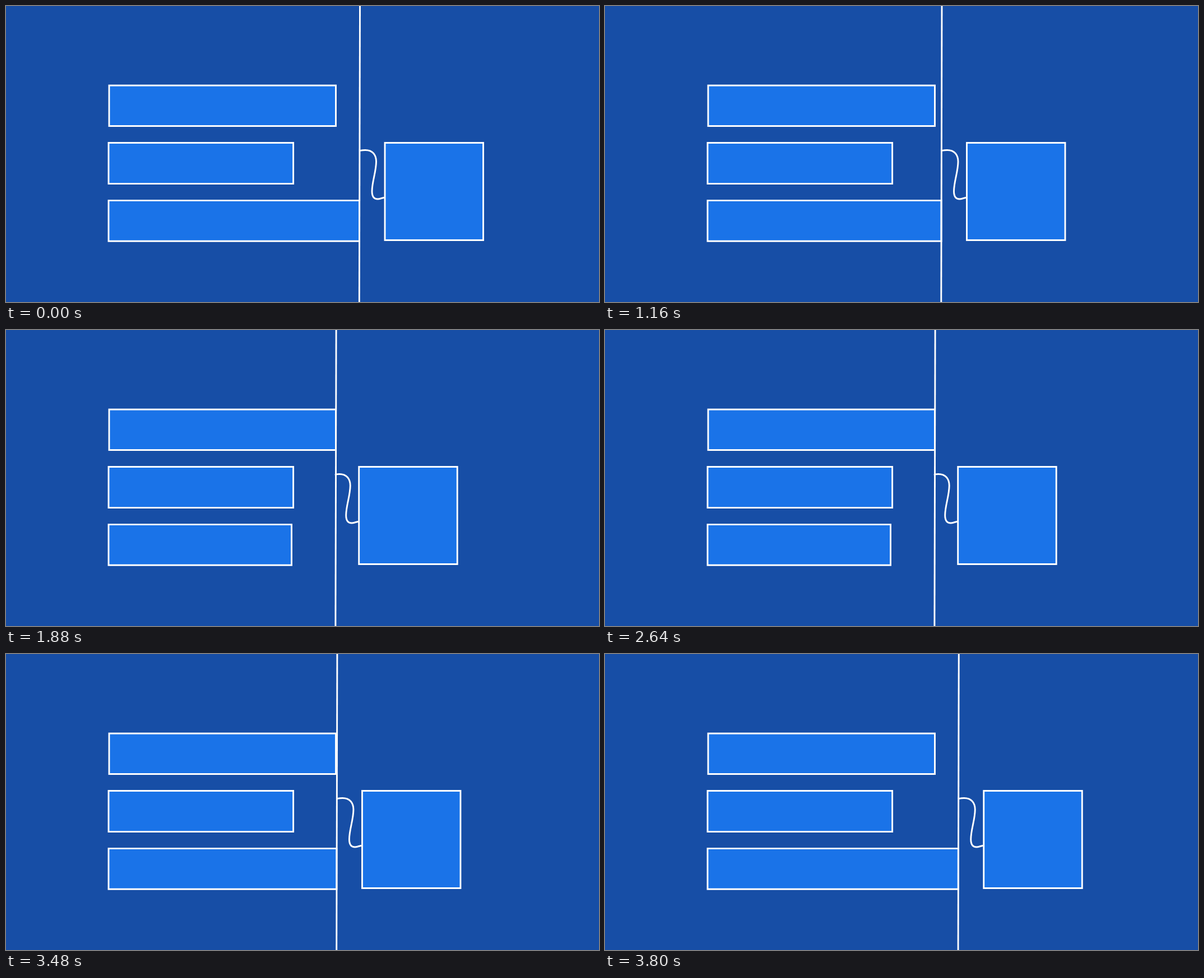
These frames come from a looping animation (1058x529 px, 3840 ms). An HTML page with a canvas:

```html
<!DOCTYPE html>
<html>
<head>
<meta charset="utf-8">
<style>
  html, body { margin: 0; height: 100%; overflow: hidden; background: #174ea6; }
  canvas { display: block; }
</style>
</head>
<body>
<canvas id="stage" width="1058" height="529"></canvas>
<script>
  const ctx = document.getElementById('stage').getContext('2d');
  const LOOP = 3840, STEP = 40, MOVE = 960;
  const WIDE = 630.5, TRAVEL = 121;        // right edge of the bottom bar
  const LINE_STOP = 42.4, BOX_STOP = 46.3; // how far the top bar lets them slide

  function box(left, top, right, bottom) {
    ctx.beginPath();
    ctx.rect(left, top, right - left, bottom - top);
    ctx.fill();
    ctx.stroke();
  }

  function spring(lineX, shift) {
    ctx.beginPath();
    ctx.moveTo(lineX, 258.6);
    ctx.save();
    ctx.translate(-shift, 0);
    ctx.bezierCurveTo(634, 258, 637, 257.5, 641, 257.5);
    ctx.bezierCurveTo(654, 257.5, 660.5, 266, 660.5, 278);
    ctx.bezierCurveTo(660.5, 296, 653, 314, 653, 331);
    ctx.bezierCurveTo(653, 341, 657, 345, 663, 345);
    ctx.bezierCurveTo(668, 345, 671, 342.5, 676, 342.5);
    ctx.restore();
    ctx.stroke();
  }

  function draw(t) {
    // Linear shrink, hold, linear growth, hold
    const progress = Math.max(0, Math.min(1, (t - 918) / MOVE, (3802 - t) / MOVE));
    const pull = TRAVEL * progress;
    const lineX = WIDE - Math.min(pull, LINE_STOP);
    const shift = Math.min(pull, BOX_STOP);

    ctx.fillStyle = '#174ea6';
    ctx.fillRect(0, 0, 1058, 529);
    ctx.fillStyle = '#1a73e8';
    ctx.strokeStyle = '#fff';
    ctx.lineWidth = 2.9;

    box(184, 142, 588.5, 214.5);
    box(183, 244.5, 512.6, 317.6);
    box(183, 347.6, WIDE - pull, 420.2);
    spring(lineX, shift);
    box(676 - shift, 244.5, 851.5 - shift, 418.5);

    ctx.beginPath();
    ctx.moveTo(lineX + 1, 0);
    ctx.lineTo(lineX - 0.2, 529);
    ctx.stroke();
  }

  const start = performance.now();
  function tick() {
    const t = (performance.now() - start) % LOOP;
    draw(Math.floor(t / STEP) * STEP);
    requestAnimationFrame(tick);
  }
  tick();
</script>
</body>
</html>
```
